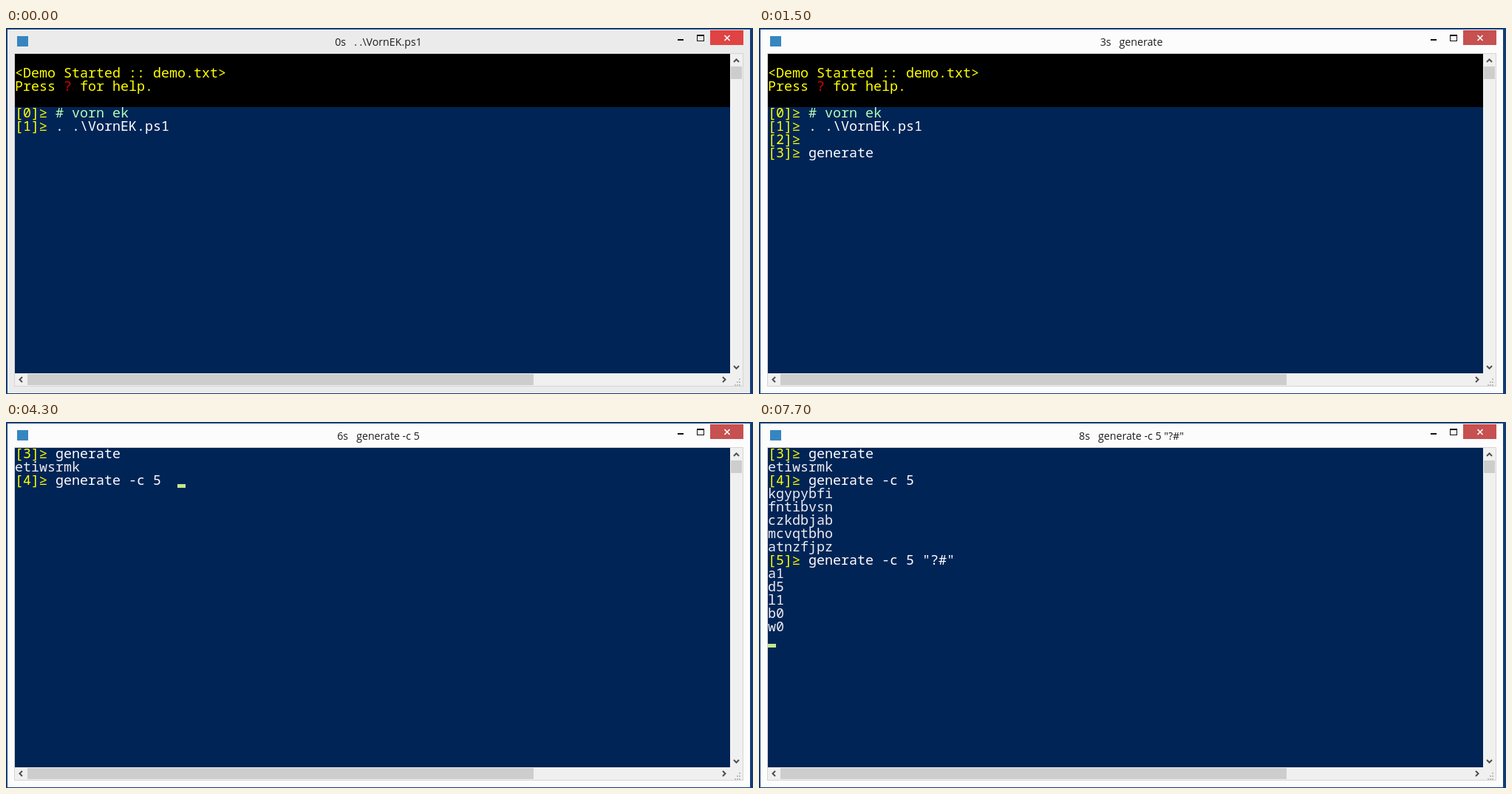
Recreate the animation shown at these times as an HTML page. Size 1011 px wide and 495 px high, loop 8000 ms.

```html
<!DOCTYPE html>
<html lang="en">
<head>
<meta charset="utf-8">
<title>Console demo</title>
<style>
  html, body { margin: 0; width: 100%; height: 100%; overflow: hidden; background: #113c75; }
  svg { display: block; width: 1011px; height: 495px; }
  text { white-space: pre; }
  #title { font: 14.2px "Open Sans", sans-serif; fill: #1c1c1c; text-anchor: middle; }
  #console text { font: 18.333px "Noto Sans Mono", monospace; }
  .bar { fill: #f0f0f0; }
  .thumb { fill: #cdcdcd; }
  .chevron { fill: none; stroke: #505050; stroke-width: 2; }
</style>
</head>
<body>
<svg viewBox="0 0 1011 495">
  <rect id="frame" x="2" y="2" width="1005" height="492"/>
  <rect x="15" y="11" width="15" height="14" fill="#3586c0"/>
  <text id="title" x="504" y="24"></text>

  <rect x="909" y="15" width="8" height="2" fill="#111"/>
  <path d="M935 9h10v9h-10z M936 11v6h8v-6z" fill="#111" fill-rule="evenodd"/>
  <rect id="close" x="953" y="3" width="45" height="20"/>
  <path d="M972.5 10l7 7m0-7l-7 7" stroke="#fff" stroke-width="1.7"/>

  <rect x="11.5" y="34.5" width="986" height="450" fill="none" stroke="#d5d5d5"/>
  <rect class="bar" x="980" y="35" width="17" height="449"/>
  <rect class="bar" x="12" y="467" width="985" height="17"/>
  <rect class="thumb" x="981" y="52" width="15" height="17"/>
  <rect class="thumb" x="29" y="468" width="685" height="15"/>
  <path class="chevron" d="M985 46l3.5-3.5 3.5 3.5 M985 457l3.5 3.5 3.5-3.5 M22 472l-3.5 3.5 3.5 3.5 M970 472l3.5 3.5-3.5 3.5"/>
  <path d="M992 475h2m-5 4h2m1 0h2m-8 4h2m1 0h2m1 0h2" stroke="#bdbdbd" stroke-width="2"/>

  <rect x="12" y="35" width="968" height="432" fill="#012456"/>
  <rect id="banner" x="12" y="35" width="968" height="72" fill="#000"/>
  <g id="console"></g>
  <rect id="cursor" width="11" height="5" fill="#c3e88d"/>
</svg>
<script>
const LOOP = 8000, CLEAR = 2400;
const LEFT = 12, TOP = 35, COL = 11, ROW = 18;
const YELLOW = "#ff0", WHITE = "#fff", OUTPUT = "#eeedf0";
const byId = id => document.getElementById(id);

const prompt = (n, command = "", color = WHITE) => [[YELLOW, `[${n}]≥ `], [color, command]];
const output = (words, row, from) =>
  words.split(" ").map((word, i) => ({ from, to: LOOP, row: row + i, parts: [[OUTPUT, word]] }));
const before = (from, row, parts) => ({ from, to: CLEAR, row, parts });
const after = (from, row, parts) => ({ from, to: LOOP, row, parts });

const lines = [
  before(0, 1, [[YELLOW, "<Demo Started :: demo.txt>"]]),
  before(0, 2, [[YELLOW, "Press "], ["#e00000", "?"], [YELLOW, " for help."]]),
  before(0, 4, prompt(0, "# vorn ek", "#b4ffb4")),
  before(0, 5, prompt(1, ". .\\VornEK.ps1")),
  before(1400, 6, prompt(2)),
  before(1500, 7, prompt(3, "generate")),
  after(CLEAR, 0, prompt(3, "generate")),
  ...output("etiwsrmk", 1, 2800),
  after(3600, 2, prompt(4, "generate -c 5")),
  ...output("kgypybfi fntibvsn czkdbjab mcvqtbho atnzfjpz", 3, 4700),
  after(5700, 8, prompt(5, 'generate -c 5 "?#"')),
  ...output("a1 d5 l1 b0 w0", 9, 6900),
];

const titles = [
  [0, "0s   . .\\VornEK.ps1"],
  [1500, "3s   generate"],
  [CLEAR, "4s   generate"],
  [3600, "6s   generate -c 5"],
  [5700, '8s   generate -c 5 "?#"'],
];

// Visible phases of the blinking cursor: from, to, column, row.
const blinks = [
  [900, 1400, 0, 6],
  [3300, 3600, 0, 2],
  [4300, 4600, 20, 2],
  [5300, 5700, 0, 8],
  [6200, 6700, 26, 8],
  [7700, LOOP, 0, 14],
];

function svgNode(name, parent, attributes) {
  const node = document.createElementNS("http://www.w3.org/2000/svg", name);
  for (const key in attributes) node.setAttribute(key, attributes[key]);
  return parent.appendChild(node);
}

for (const line of lines) {
  line.node = svgNode("text", byId("console"), { x: LEFT, y: TOP + line.row * ROW + 14 });
  for (const [fill, text] of line.parts) svgNode("tspan", line.node, { fill }).textContent = text;
}

const show = (node, visible) => { node.style.display = visible ? "" : "none"; };

function closeColor(t) {
  if (t >= 400) return "#c75050";
  const fade = Math.min(Math.floor(t / 100) / 3, 1);
  const mix = (a, b) => Math.round(a + (b - a) * fade);
  return `rgb(${mix(224, 188)},${mix(67, 188)},${mix(67, 188)})`;
}

function draw(t) {
  byId("frame").setAttribute("fill", t < 400 ? "#ebebeb" : "#fcfcfc");
  byId("close").setAttribute("fill", closeColor(t));
  byId("title").textContent = titles.findLast(([at]) => t >= at)[1];
  show(byId("banner"), t < CLEAR);
  for (const { node, from, to } of lines) show(node, t >= from && t < to);

  const blink = blinks.find(([from, to]) => t >= from && t < to);
  show(byId("cursor"), blink);
  if (blink) {
    byId("cursor").setAttribute("x", LEFT + blink[2] * COL);
    byId("cursor").setAttribute("y", TOP + blink[3] * ROW + 13);
  }
}

const start = performance.now();
function tick() {
  draw((performance.now() - start) % LOOP);
  requestAnimationFrame(tick);
}
tick();
</script>
</body>
</html>
```
